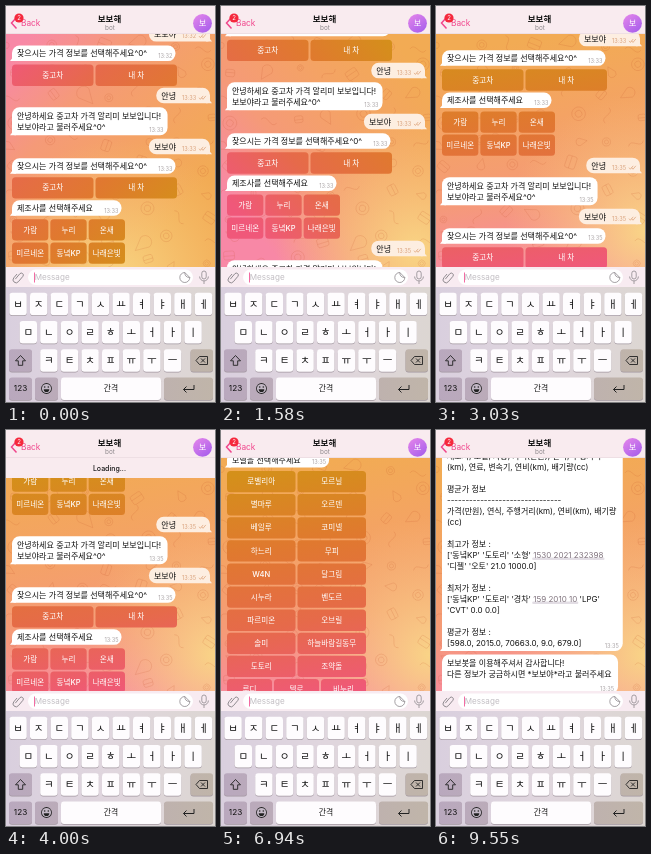
Animation, 209 px wide and 396 px high, one loop 9640 ms. Source, as an HTML page with a canvas:

```html
<!DOCTYPE html>
<html lang="ko">
<head>
<meta charset="utf-8">
<style>
html, body { margin: 0; width: 100%; height: 100%; overflow: hidden; background: #fff; }
canvas { display: block; width: 209px; height: 396px; }
</style>
</head>
<body>
<canvas id="stage"></canvas>
<script>
const W = 209, H = 396, LOOP = 9640, HOLD = 9550, TOP = 28, BOTTOM = 262, END = 259.5;
const FONT = 'Inter, "Noto Sans CJK KR", "Noto Sans CJK JP", sans-serif';
const PINK = '#f0478c', BODY = 8.03;
const SEND = [1250, 2450];

const canvas = document.getElementById('stage');
const c = canvas.getContext('2d');
const dpr = window.devicePixelRatio || 1;
canvas.width = W * dpr;
canvas.height = H * dpr;

const mix = (a, b, k) => a + (b - a) * k;
const ease = (t, start, span) => 1 - (1 - Math.min(1, Math.max(0, (t - start) / span))) ** 3;

// ---- drawing helpers ----
function text(s, x, y, size, color, align = 'left', weight = 400) {
  c.font = `${weight} ${size}px ${FONT}`;
  c.textAlign = align;
  c.fillStyle = color;
  c.fillText(s, x, y + size * 0.36);
  return c.measureText(s).width;
}
function width(s) {
  c.font = `400 ${BODY}px ${FONT}`;
  return c.measureText(s).width;
}
function box(x, y, w, h, r, fill) {
  c.beginPath();
  c.roundRect(x, y, w, h, r);
  c.fillStyle = fill;
  c.fill();
}
function disc(x, y, r, fill) {
  c.beginPath();
  c.arc(x, y, r, 0, 7);
  c.fillStyle = fill;
  c.fill();
}
function line(points, color, lw = 1) {
  c.beginPath();
  points.forEach(([x, y]) => c.lineTo(x, y));
  c.strokeStyle = color;
  c.lineWidth = lw;
  c.stroke();
}
function linear(x0, y0, x1, y1, ...colors) {
  const g = c.createLinearGradient(x0, y0, x1, y1);
  colors.forEach((col, i) => g.addColorStop(i / (colors.length - 1), col));
  return g;
}

// ---- wallpaper: the pink and gold ends swing round after each sent message ----
const POSES = [ // pink x,y  gold x,y  yellow x,y
  [0, 55, 175, 205, 110, 275],
  [10, 220, 185, 20, 209, 240],
  [80, 272, 45, 40, 209, 225]
];
let buttonFill;
function wallpaper(t) {
  const a = ease(t, SEND[0], 700), b = ease(t, SEND[1], 900);
  const p = POSES[0].map((v, i) => mix(mix(v, POSES[1][i], a), POSES[2][i], b));
  buttonFill = linear(p[0], p[1], p[2], p[3], '#f0587a', '#e66a4a', '#e0792f', '#d4901a');
  c.fillStyle = linear(p[0], p[1], p[2], p[3], '#f888a6', '#f59a78', '#f4a364', '#f2ab54');
  c.fillRect(0, 0, W, BOTTOM);
  const g = c.createRadialGradient(p[4], p[5], 0, p[4], p[5], 140);
  g.addColorStop(0, 'rgba(249,216,134,.95)');
  g.addColorStop(1, 'rgba(248,200,120,0)');
  c.fillStyle = g;
  c.fillRect(0, 0, W, BOTTOM);
  doodles();
}
function doodles() {
  let seed = 11;
  const rnd = () => (seed = seed * 16807 % 2147483647) / 2147483647;
  c.strokeStyle = 'rgba(190,80,40,.18)';
  c.lineWidth = 0.8;
  for (let i = 0; i < 70; i++) {
    c.save();
    c.translate(i % 7 * 32 + rnd() * 16, 34 + Math.floor(i / 7) * 24 + rnd() * 12);
    c.rotate(rnd() * 6);
    c.beginPath();
    const kind = i % 4, r = 3 + rnd() * 4;
    if (kind === 0) { // cone
      c.arc(0, 0, r, Math.PI, 0);
      c.lineTo(0, r * 2);
      c.closePath();
    } else if (kind === 1) { // ring
      c.arc(0, 0, r, 0, 7);
      c.moveTo(r / 2, 0);
      c.arc(0, 0, r / 2, 0, 7);
    } else if (kind === 2) { // wave
      c.moveTo(-8, 0);
      c.bezierCurveTo(-3, -8, 3, 8, 8, 0);
    } else { // cup
      c.roundRect(-r, -r * 0.7, r * 2, r * 1.6, 2);
      c.moveTo(-r, 0);
      c.lineTo(r, 0);
    }
    c.stroke();
    c.restore();
  }
}

// ---- chat items: { at, h, draw(y, t) } ----
const items = [];
const add = (at, h, draw) => items.push({ at, h, draw });

function bubble(x, y, w, h, fill, mine) {
  box(x, y, w, h, mine ? [7.5, 7.5, 3, 7.5] : [7.5, 7.5, 7.5, 3], fill);
  const edge = mine ? x + w : x, d = mine ? 2 : -2;
  c.beginPath();
  c.moveTo(edge - d, y + h - 5);
  c.lineTo(edge + d, y + h);
  c.lineTo(edge - d * 2, y + h);
  c.fill();
}
function ticks(x, y) {
  for (const d of [0, 2.6])
    line([[x + d, y], [x + d + 1.4, y + 1.6], [x + d + 4.2, y - 1.8]], '#dc9c70', 0.7);
}
function mine(at, s, time) {
  add(at, 19.5, y => {
    const w = width(s) + 39, x = 204 - w;
    bubble(x, y, w, 15.5, '#fdeee1', true);
    text(s, x + 5, y + 8, BODY, '#111');
    text(time, 176, y + 10, 5.6, '#d9a07a');
    ticks(193, y + 10);
  });
}
function theirs(at, s, time) {
  add(at, 19, y => {
    const w = width(s) + 33.5;
    bubble(6, y, w, 15.5, '#fff');
    text(s, 11, y + 8, BODY, '#111');
    text(time, 3 + w, y + 10.3, 5.6, '#aaa4a6', 'right');
  });
}
// Parts between bars are drawn as soft links.
function richLine(s, y) {
  let x = 11;
  s.split('|').forEach((part, i) => {
    const w = width(part);
    if (i % 2) box(x - 1, y + 2.5, w + 2, 2.5, 1, '#e2dde4');
    x += text(part, x, y, BODY, i % 2 ? '#82757f' : '#111');
  });
}
function block(at, lines, pitch, time) {
  const h = 16.5 + (lines.length - 1) * pitch;
  add(at, h + 3.5, y => {
    const w = Math.max(...lines.map(s => width(s.replaceAll('|', '')))) + 11.5;
    bubble(6, y, w, h, '#fff');
    lines.forEach((s, i) => richLine(s, y + 8.5 + i * pitch));
    text(time, 2 + w, y + h - 5.5, 5.6, '#aaa4a6', 'right');
  });
}
function buttons(at, labels, total, pressed = {}) {
  const w = (total + 2) / labels.length - 2;
  add(at, 23.1, (y, t) => labels.forEach((s, i) => {
    const x = 6 + i * (w + 2);
    box(x, y, w, 21.3, 3.5, buttonFill);
    const tap = pressed[s];
    if (t > tap && t < tap + 350) box(x, y, w, 21.3, 3.5, 'rgba(255,130,170,.35)');
    text(s, x + w / 2, y + 10.5, 7.6, '#fff', 'center', 500);
  }));
}
function ask(at, time, tap) {
  theirs(at, '찾으시는 가격 정보를 선택해주세요^0^', time);
  buttons(at, ['중고차', '내 차'], 165, { '중고차': tap });
}
function makers(at, time, tap) {
  theirs(at, '제조사를 선택해주세요', time);
  buttons(at, ['가람', '누리', '온새'], 113);
  buttons(at, ['미르네온', '동녘KP', '나래은빛'], 113, { '동녘KP': tap });
}
function hello(at, time) {
  block(at, ['안녕하세요 중고차 가격 알리미 보보입니다!', '보보야라고 불러주세요^0^'], 11.5, time);
}

mine(-999, '보보야', '13:32');
ask(-999, '13:32');
mine(-999, '안녕', '13:33');
hello(-999, '13:33');
mine(-999, '보보야', '13:33');
ask(-999, '13:33');
makers(-999, '13:33');
mine(SEND[0], '안녕', '13:35');
hello(1560, '13:35');
mine(SEND[1], '보보야', '13:35');
ask(2850, '13:35', 3450);
makers(3800, '13:35', 6000);

const PICK = 6720;
theirs(PICK, '모델을 선택해주세요', '13:35');
[['로벨리아', '모르닐'], ['별마루', '오르덴'], ['베일루', '코미넬'], ['하느리', '무피'],
 ['W4N', '달그림'], ['시누라', '벤도르'], ['파르미온', '오브릴'], ['솔미', '하늘바람길동무'],
 ['도토리', '조약돌'], ['루디', '텔로', '비누리']]
  .forEach(row => buttons(PICK, row, 139, { '도토리': 8580 }));

const DASHES = '-'.repeat(31);
block(8960, [
  '최고가/최저가 정보', DASHES,
  '제조사, 모델, 차종, 가격(만원), 연식, 주행거리',
  '(km), 연료, 변속기, 연비(km), 배기량(cc)', '',
  '평균가 정보', DASHES,
  '가격(만원), 연식, 주행거리(km), 연비(km), 배기량', '(cc)', '',
  '최고가 정보 :',
  "['동녘KP' '도토리' '소형' |1530 2021 232398|",
  "'디젤' '오토' 21.0 1000.0]", '',
  '최저가 정보 :',
  "['동녘KP' '도토리' '경차' |159 2010 10| 'LPG'",
  "'CVT' 0.0 0.0]", '',
  '평균가 정보 :',
  '[598.0, 2015.0, 70663.0, 9.0, 679.0]'
], 11, '13:35');
block(9400, ['보보봇을 이용해주셔서 감사합니다!', '다른 정보가 궁금하시면 *보보야*라고 불러주세요', ''], 11.5, '13:35');

function chat(t) {
  const shown = items.filter(i => t >= i.at);
  let y = END - shown.reduce((sum, i) => sum + i.h * ease(t, i.at, 350), 0);
  for (const i of shown) {
    if (y < BOTTOM && y + i.h > 0) i.draw(y, t);
    y += i.h;
  }
}

// ---- header ----
const LOADING = [[3550, 4300], [6250, 6760], [8680, 9000]];
function header(t) {
  const loading = LOADING.some(([a, b]) => t >= a && t < b);
  c.fillStyle = '#f9ebef';
  c.fillRect(0, 0, W, loading ? 48 : TOP);
  c.fillStyle = '#e2d2d8';
  c.fillRect(0, TOP - 0.5, W, 0.5);
  if (loading) text('Loading...', 103.5, 38.5, 7, '#111', 'center', 500);
  line([[10.5, 11.5], [5.5, 17], [10.5, 22.5]], PINK, 1.5);
  text('Back', 15, 17.5, 8.3, PINK);
  disc(13, 12, 4.6, '#f5283c');
  text('2', 13, 12, 6, '#fff', 'center');
  text('보보해', 103.5, 13, 8.5, '#111', 'center', 600);
  text('bot', 104, 22, 6.4, '#908a8e', 'center');
  disc(196.5, 17.3, 9.4, linear(190, 8, 204, 27, '#e284ea', '#a45cec'));
  text('보', 196.5, 17.3, 8.2, '#fff', 'center');
}

// ---- input bar ----
const DRAFTS = [
  [420, 110, ['ㅇ', '아', '안', '안ㄴ', '안녀', '안녕'], SEND[0]],
  [1760, 100, ['ㅂ', '보', '봅', '보보', '보봉', '보보야'], SEND[1]]
];
function draftAt(t) {
  for (const [start, step, states, sent] of DRAFTS)
    if (t >= start && t < sent)
      return states[Math.min(states.length - 1, Math.floor((t - start) / step))];
  return '';
}
function inputBar(t) {
  const draft = draftAt(t), grey = '#8d888d';
  c.fillStyle = '#f8ebf1';
  c.fillRect(0, BOTTOM - 1, W, 21);
  box(22, 263.5, 165, 15.5, 7.75, '#fff');
  c.save();
  c.translate(12, 271.5);
  c.rotate(0.7);
  c.beginPath();
  c.moveTo(-3, -2);
  c.lineTo(-3, 3);
  c.arc(0, 3, 3, Math.PI, 0, true);
  c.lineTo(3, -4);
  c.arc(1, -4, 2, 0, Math.PI, true);
  c.lineTo(-1, 3);
  c.strokeStyle = grey;
  c.lineWidth = 0.9;
  c.stroke();
  c.restore();
  const w = draft ? text(draft, 28.8, 271.5, 8.1, '#111') : 0;
  if (!draft) text('Message', 28.8, 271.5, 8.1, '#c2bec3');
  c.fillStyle = PINK;
  c.fillRect(28 + w, 266.5, 0.8, 10);
  if (draft) {
    const x = 197.5;
    disc(x, 271.5, 8.6, linear(192, 263, 204, 280, '#f0559a', '#dc52bc'));
    line([[x, 276], [x, 267.5]], '#fff', 1.3);
    line([[x - 3.3, 270.6], [x, 267.3], [x + 3.3, 270.6]], '#fff', 1.3);
    return;
  }
  c.strokeStyle = grey;
  c.lineWidth = 0.8;
  c.beginPath();
  c.arc(178.8, 271.5, 5, 0, Math.PI * 1.5);
  c.quadraticCurveTo(178.8, 271.5, 183.8, 271.5);
  c.lineTo(178.8, 266.5);
  c.stroke();
  c.beginPath();
  c.roundRect(195.8, 265, 4.4, 8, 2.2);
  c.moveTo(202.4, 270.5);
  c.arc(198, 270.5, 4.4, 0, Math.PI);
  c.moveTo(198, 275);
  c.lineTo(198, 278);
  c.stroke();
}

// ---- keyboard ----
function key(x, y, w, label, fill = '#fefcfe', size = 10.5) {
  box(x, y + 0.8, w, 22.5, 3, '#a1969f');
  box(x, y, w, 22.5, 3, fill);
  if (label) text(label, x + w / 2, y + 11, size, '#111', 'center');
}
function keyboard() {
  c.fillStyle = linear(0, 0, W, 0, '#d9cfde', '#e0d6de', '#dcd6d2');
  c.fillRect(0, 281, W, H - 281);
  const dim = linear(0, 0, W, 0, '#b9a8be', '#c0b5a9');
  [['ㅂㅈㄷㄱㅅㅛㅕㅑㅐㅔ', 3.4, 286.8], ['ㅁㄴㅇㄹㅎㅗㅓㅏㅣ', 13.6, 315], ['ㅋㅌㅊㅍㅠㅜㅡ', 34.2, 343.3]]
    .forEach(([row, x, y]) => [...row].forEach((s, i) => key(x + i * 20.6, y, 17.4, s)));
  key(3, 343.3, 23, '', dim);
  key(184.5, 343.3, 22.5, '', dim);
  key(3, 371.5, 23, '123', dim, 8.2);
  key(29, 371.5, 23, '', dim);
  key(55, 371.5, 100, '간격', '#fefcfe', 7.8);
  key(158, 371.5, 49, '', dim);
  const ink = '#222';
  line([[14.5, 349.5], [9.5, 354.8], [12.3, 354.8], [12.3, 359.3], [16.7, 359.3], [16.7, 354.8], [19.5, 354.8], [14.5, 349.5]], ink, 0.9);
  line([[190, 354.5], [193.5, 350.5], [201.5, 350.5], [201.5, 358.5], [193.5, 358.5], [190, 354.5]], ink, 0.9);
  line([[195, 352.5], [199, 356.5]], ink, 0.9);
  line([[199, 352.5], [195, 356.5]], ink, 0.9);
  line([[188, 379], [188, 383.5], [177.5, 383.5]], ink, 1);
  line([[180.5, 380.5], [177.5, 383.5], [180.5, 386.5]], ink, 1);
  disc(40.5, 382.5, 5.4, ink);
  disc(40.5, 382.5, 4.6, '#c3b8c6');
  disc(38.7, 381, 0.8, ink);
  disc(42.3, 381, 0.8, ink);
  c.beginPath();
  c.arc(40.5, 383.2, 2.8, 0, Math.PI);
  c.fillStyle = ink;
  c.fill();
}

const began = performance.now();
function frame() {
  // The last pose rests until the loop restarts.
  const t = Math.min(HOLD, (performance.now() - began) % LOOP);
  c.setTransform(dpr, 0, 0, dpr, 0, 0);
  wallpaper(t);
  chat(t);
  header(t);
  inputBar(t);
  keyboard();
  requestAnimationFrame(frame);
}
frame();
</script>
</body>
</html>
```
